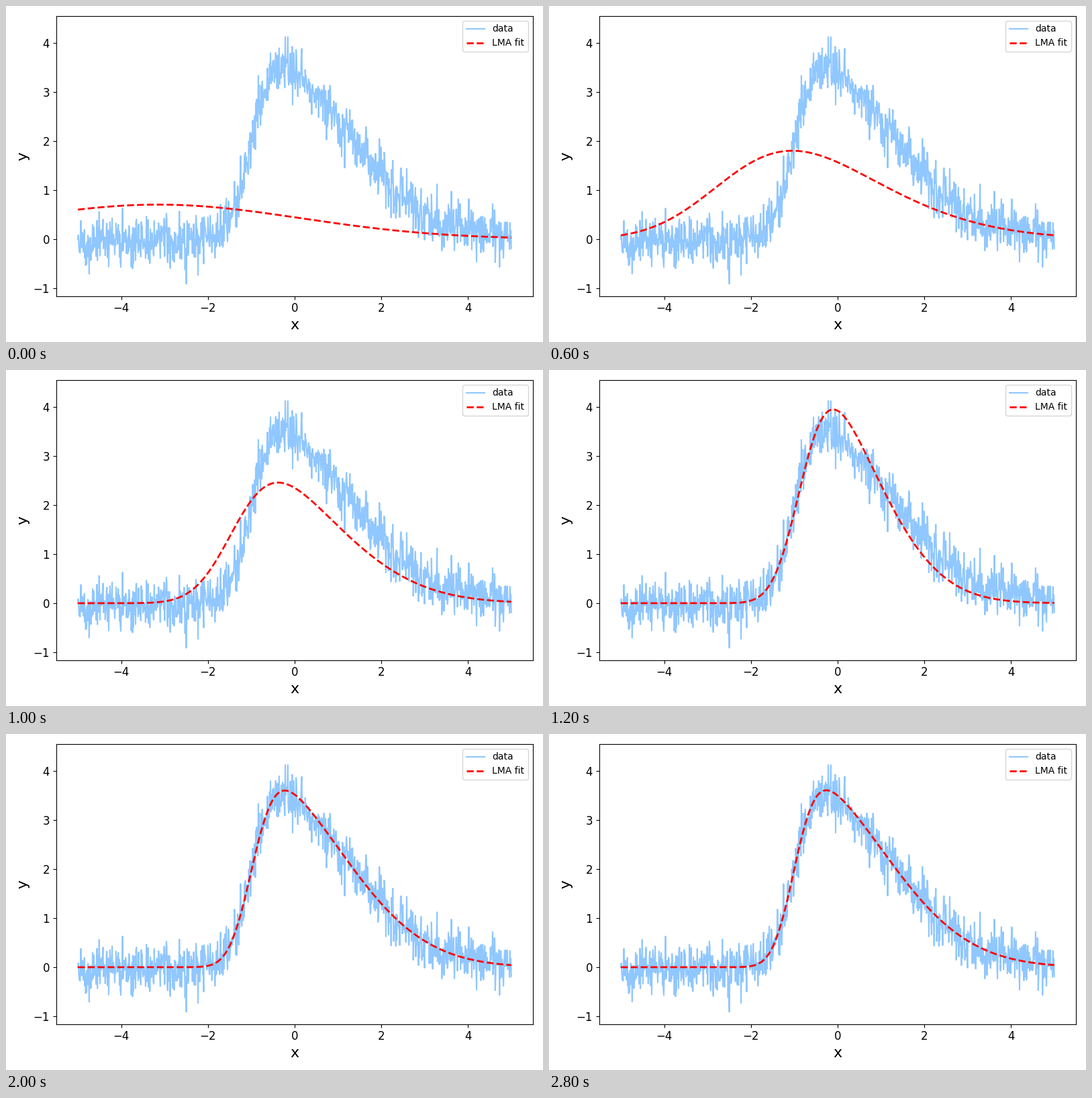
Recreate the animation shown at these times as a matplotlib script. Size 800 px wide and 500 px high, loop 3600 ms.

```python
import math

import matplotlib.pyplot as plt
import numpy as np
from matplotlib.animation import FuncAnimation

plt.rcParams["font.family"] = "DejaVu Sans"

POINTS = 1000
FRAMES = 18
INTERVAL = 200
NOISE = 0.28

# Height, location, width and skew of the bell
BEST = (3.99, -1.0, 2.0, 5.0)

# Solver step -> bell; steps in between are blended
KEYS = {
    0: (1.41, -3.15, 3.30, 0.0),
    1: (1.78, -2.20, 2.60, 2.2),
    2: (1.805, -2.99, 3.45, 1.25),
    4: (3.03, -2.18, 2.36, 2.8),
    5: (3.03, -1.40, 2.10, 2.8),
    6: (4.79, -0.85, 1.58, 3.0),
    8: (4.18, -0.94, 1.86, 3.6),
    10: (4.02, -0.985, 1.985, 4.7),
    14: BEST,
}

erf = np.vectorize(math.erf)
x = np.linspace(-5, 5, POINTS)


def skewed_bell(height, loc, width, skew):
    z = (x - loc) / width
    return height * np.exp(-z**2 / 2) * (1 + erf(skew * z / math.sqrt(2))) / 2


def fit_at(step):
    bell = [np.interp(step, list(KEYS), values) for values in zip(*KEYS.values())]
    return skewed_bell(*bell)


rng = np.random.default_rng(7)
signal = skewed_bell(*BEST) + rng.normal(0, NOISE, POINTS)

fig, ax = plt.subplots(figsize=(8, 5), dpi=100)
ax.plot(x, signal, color="#90c7ff", lw=1.5, label="data")
fit, = ax.plot(x, fit_at(0), "r--", lw=2, label="LMA fit")
ax.set_xlim(-5.5, 5.5)
ax.set_ylim(-1.16, 4.548)
ax.set_xlabel("x", fontsize=16)
ax.set_ylabel("y", fontsize=16)
ax.tick_params(labelsize=12)
ax.legend(loc="upper right", fontsize=10)
fig.tight_layout()


def update(frame):
    fit.set_ydata(fit_at(frame))
    return fit,


anim = FuncAnimation(fig, update, frames=FRAMES, interval=INTERVAL,
                     repeat=True, repeat_delay=0)
plt.show()
```
